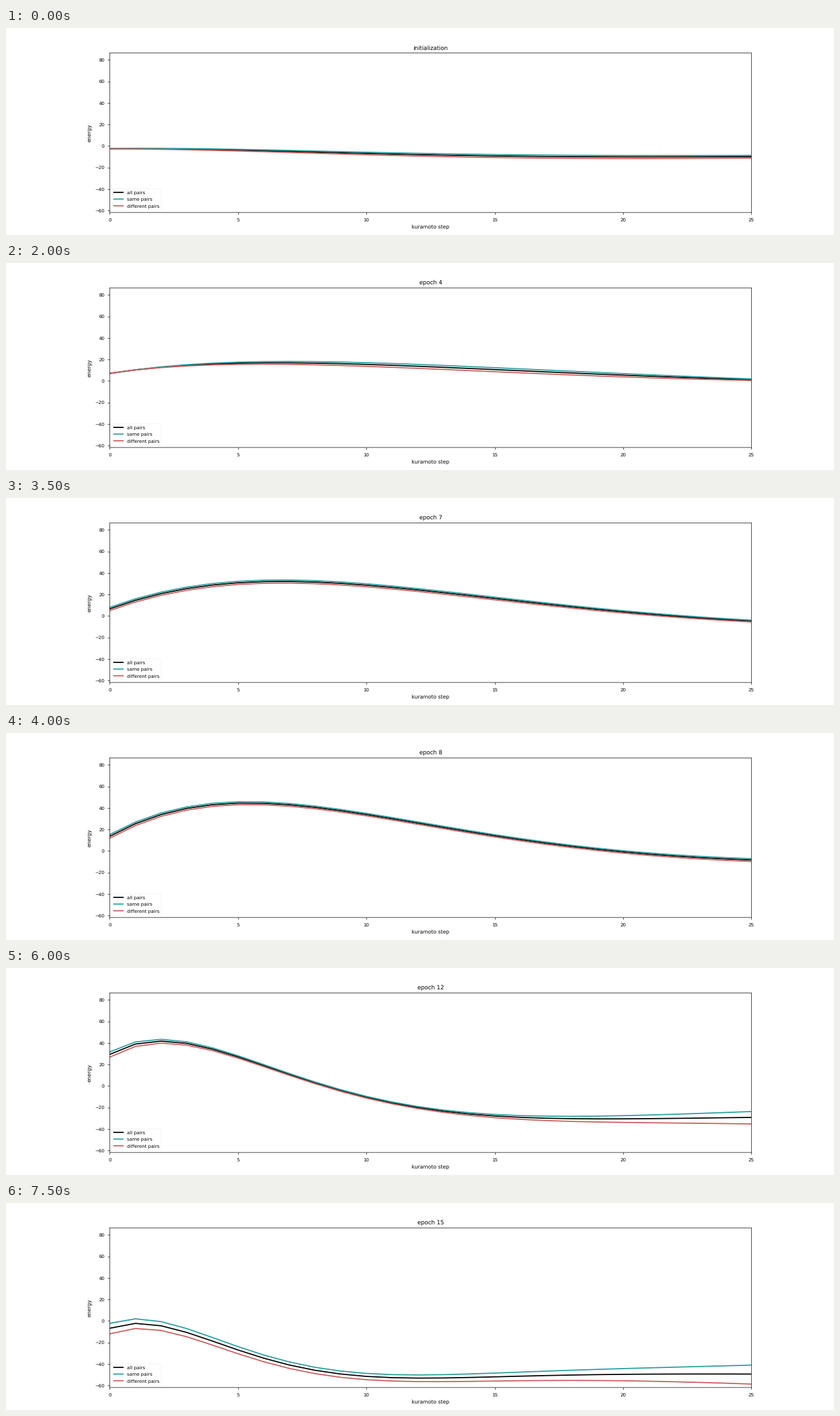
Animation, 1280 px wide and 320 px high, one loop 8 s. Source, as a matplotlib script:

```python
import matplotlib.pyplot as plt
import numpy as np
from matplotlib.animation import FuncAnimation

WIDTH, HEIGHT, DPI = 1280, 320, 64
EPOCHS = 16
DIFF_RATIO = 1.12  # spread of the "different" curve relative to "same"
STEPS = np.arange(26)
GAP_STEPS = [0, 10, 25]

# epoch: peak step, peak energy, damping, frequency, resting energy,
#        then the gap of the "same" curve at GAP_STEPS
KEYS = {
    0: (0.8, -2.5, 0.08, 0.155, -8.9, 0.2, 1.1, 1.2),
    2: (0.0, 19.5, 0.20, 0.02, -4.0, -0.9, 0.55, 0.2),
    5: (9.7, 15.6, 0.05, 0.08, -6.4, 0.2, 2.1, 0.9),
    7: (6.7, 32.1, 0.09, 0.11, -7.0, 1.4, 1.3, 0.8),
    10: (2.8, 69.4, 0.16, 0.146, -9.4, 2.0, 0.7, 2.1),
    13: (1.6, 27.8, 0.205, 0.2, -37.2, 2.4, 0.8, 7.1),
    15: (1.1, -2.2, 0.234, 0.283, -49.5, 4.6, 2.75, 8.3),
}


def params(epoch):
    return [np.interp(epoch, list(KEYS), column)
            for column in zip(*KEYS.values())]


def damped(peak_at, peak, damping, freq, rest):
    """Oscillator released at its peak and settling at rest."""
    t = STEPS - peak_at
    swing = np.cos(freq * t) + damping / freq * np.sin(freq * t)
    return rest + (peak - rest) * np.exp(-damping * t) * swing


def curves(epoch):
    """All, same and different pairs."""
    *motion, start, middle, end = params(epoch)
    mean = damped(*motion)
    gap = np.polyval(np.polyfit(GAP_STEPS, [start, middle, end], 2), STEPS)
    return mean, mean + gap, mean - DIFF_RATIO * gap


plt.rcParams.update({
    "font.family": "DejaVu Sans",
    "text.hinting": "none",
    "path.snap": False,
})

fig = plt.figure(figsize=(WIDTH / DPI, HEIGHT / DPI), dpi=DPI)
# half a line width of shift keeps the unsnapped spines crisp
dx, dy = 0.32 / WIDTH, 0.32 / HEIGHT
ax = fig.add_axes([0.125 + dx, 0.11 - dy, 0.775, 0.77])

styles = [("all pairs", "black"),
          ("same pairs", "#2a9d9f"),
          ("different pairs", "#cd5c5c")]
lines = [ax.plot(STEPS, 0 * STEPS, color=color, lw=2, label=label)[0]
         for label, color in styles]

ax.set_xlim(0, 25)
ax.set_ylim(-61.7, 86.3)
ax.set_xticks(range(0, 26, 5))
ax.set_yticks(range(-60, 81, 20))
ax.tick_params(labelsize=8, pad=5.5)
ax.set_xlabel("kuramoto step", fontsize=9)
ax.set_ylabel("energy", fontsize=9)
title = ax.set_title("initialization", fontsize=10)
ax.legend(loc="lower left", fontsize=8, edgecolor="0.95")


def update(epoch):
    for line, energy in zip(lines, curves(epoch)):
        line.set_ydata(energy)
    title.set_text(f"epoch {epoch}" if epoch else "initialization")
    return [*lines, title]


anim = FuncAnimation(fig, update, frames=EPOCHS, interval=500,
                     repeat=True, repeat_delay=0, blit=False)
plt.show()
```
